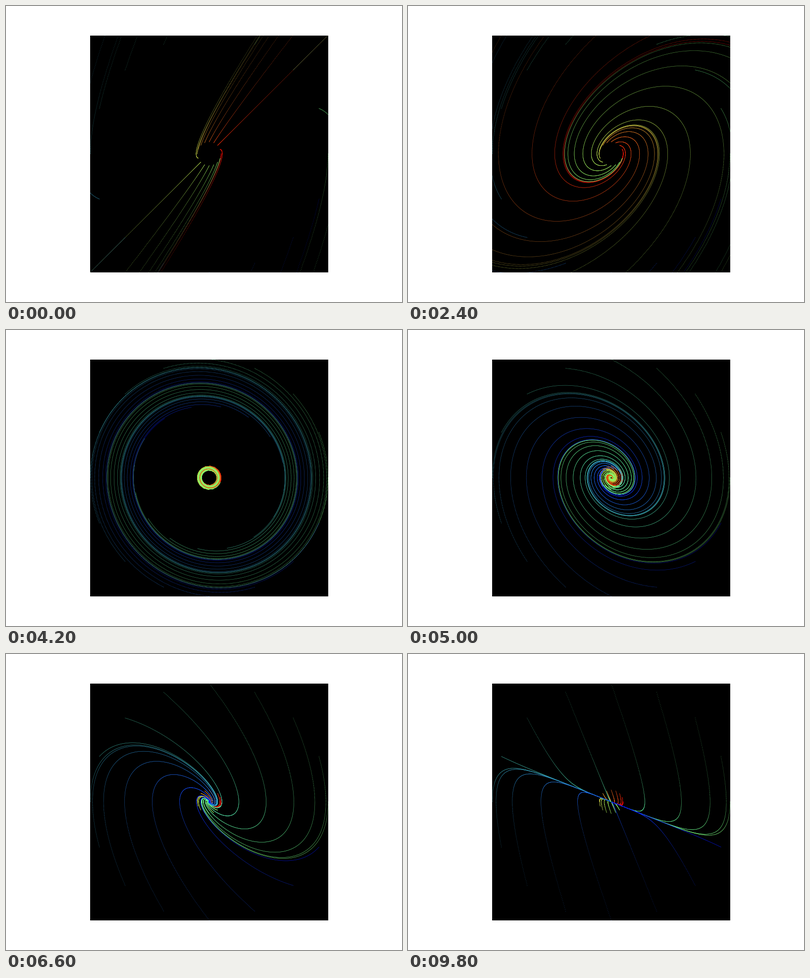
Write an HTML page with a canvas that moves like this. It is 800x600 px and loops after 10 s.

```html
<!DOCTYPE html>
<html lang="en">
<head>
<meta charset="utf-8">
<title>Damped oscillator phase portrait</title>
<style>
  html, body { margin: 0; width: 100%; height: 100%; overflow: hidden; background: #fff; }
  canvas { display: block; }
</style>
</head>
<body>
<canvas id="stage" width="800" height="600"></canvas>
<script>
const ctx = document.getElementById('stage').getContext('2d');
const BOX = [170, 60, 481, 480];
const CENTER_X = 410.5, CENTER_Y = 299.5, SCALE = 240;
const FRAME_MS = 200, FRAMES = 50;
const DT = 0.005, STEPS = 2000;
const DOT = 0.6;
const ANGLES = 16, RADII = [0.1, 1];
const COUNT = ANGLES * RADII.length;

ctx.beginPath();
ctx.rect(...BOX);
ctx.clip();

// Red through yellow, green and cyan to blue.
function trajectoryColor(index) {
  const t = index / COUNT;
  const channels = [1 - t, Math.sin(Math.PI * t), t].map(v => Math.round(255 * v));
  return `rgb(${channels})`;
}

// Smaller than a pixel, so brightness builds up where the motion is slow.
function drawDot(x, v) {
  ctx.fillRect(CENTER_X + SCALE * x - DOT / 2, CENTER_Y - SCALE * v - DOT / 2, DOT, DOT);
}

// Euler steps of x'' = -x - damping * x', one dot per step.
function drawTrajectory(index, damping) {
  const radius = RADII[Math.floor(index / ANGLES)];
  const angle = 2 * Math.PI * index / ANGLES;
  let x = radius * Math.cos(angle);
  let v = radius * Math.sin(angle);
  ctx.fillStyle = trajectoryColor(index);
  for (let step = 0; step < STEPS; step++) {
    if (Math.abs(x) < 1.01 && Math.abs(v) < 1.01) drawDot(x, v);
    [x, v] = [x + DT * v, v - DT * (x + damping * v)];
  }
}

function drawPortrait(damping) {
  ctx.fillStyle = '#000';
  ctx.fillRect(...BOX);
  for (let index = 0; index < COUNT; index++) drawTrajectory(index, damping);
}

let shown = -1;
function tick() {
  const frame = Math.floor(performance.now() / FRAME_MS) % FRAMES;
  if (frame !== shown) {
    shown = frame;
    drawPortrait(-2 + frame / 10);
  }
  requestAnimationFrame(tick);
}
tick();
</script>
</body>
</html>
```
